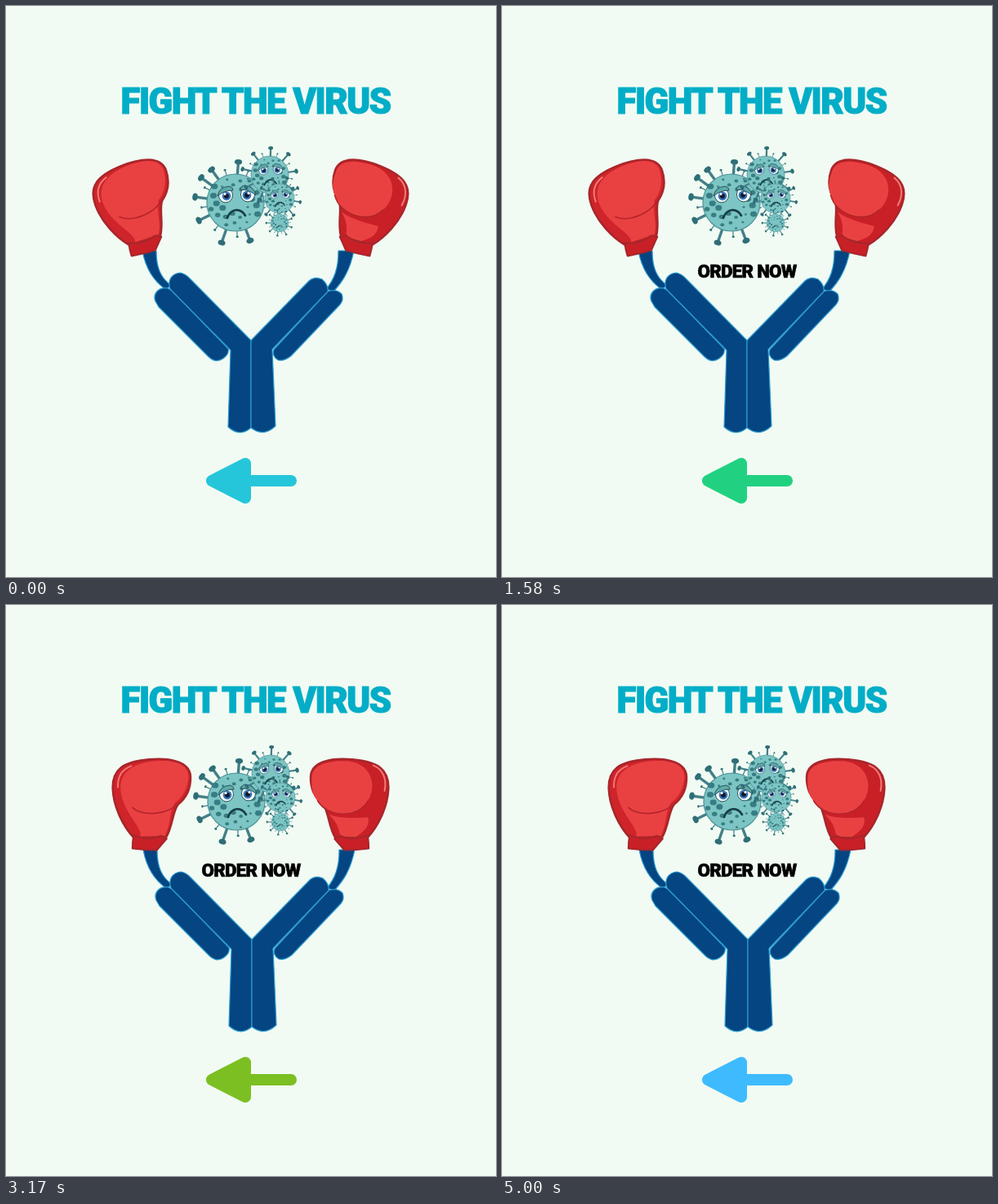
These frames come from a looping animation (600x700 px, 5.04 s). An HTML page:

```html
<!DOCTYPE html>
<html lang="en">
<head>
<meta charset="utf-8">
<title>Fight the virus</title>
<style>
  html, body { margin: 0; width: 100%; height: 100%; overflow: hidden; background: #f1fbf3; }
  svg { display: block; width: 600px; height: 700px; }
  text { font-family: Roboto, sans-serif; font-weight: 900; font-stretch: 70%; text-anchor: middle; paint-order: stroke; }
  .chain path { fill: #054581; stroke: #2a9bd0; stroke-width: 1.2; stroke-linejoin: round; }
  .lit { fill: #e94142; }
  .crease { fill: none; stroke: #b3242a; stroke-width: 1.6; stroke-linecap: round; }
  .shine { fill: none; stroke: #f07a77; stroke-width: 2; stroke-linecap: round; }
</style>
</head>
<body>
<svg viewBox="0 0 600 700">
  <defs>
    <path id="fist" stroke="#a8262b" stroke-width="2.6" stroke-linejoin="round"
      d="M160 287C148 272 138 248 138.500 226C139 202 153 193 185 192.500C212 192 235 199 234.500 217
         C234 232 227 243 217 250C209 259 209 276 199 290Z"/>
    <path id="cuff" fill="#c92027" stroke="#a8262b" stroke-width="2.2" stroke-linejoin="round"
      d="M160 284Q178 293 193 287L200 291Q194 297 187 304Q172 303 157.500 300Q158 292 160 284Z"/>
  </defs>
  <text id="title" x="305.500" y="131.500" fill="#02adc7" stroke="#02adc7" stroke-width="1.2">FIGHT THE VIRUS</text>
  <text id="order" x="300" y="333" stroke="#000" stroke-width=".6">ORDER NOW</text>

  <g id="body">
    <g class="chain">
      <path d="M167 300L184 300C184 322 190 334 203 343L195 347C182 338 171 322 167 300Z"/>
      <path d="M407 300L426 300C421 325 412 338 401 350L392 347C402 335 407 322 407 300Z"/>
      <path d="M183 362C179 352 188 344 198 346L203 349L272 420C274 428 264 435 257 435Q252 434 248 430L187 369Z"/>
      <path d="M394 350Q404 346 411 353Q414 360 409 366L349 429Q340 436 333 434Q325 429 328 421Z"/>
      <path d="M300 410L300 517Q286 529 272 516L275 422L201 347C197 335 204 328 213 327Q219 328 224 333Z"/>
      <path d="M300 410L371 337Q378 331 387 335Q395 342 394 350L326 421L330 515Q315 529 300 517Z"/>
    </g>
    <g id="germs"></g>
  </g>

  <g id="left">
    <use href="#fist" fill="#cf242a"/>
    <path class="lit" d="M148 226C149 203 170 195 193 195C221 195 233 204 232 217C230 232 223 242 213 248
      C205 260 206 276 198 287L168 286C172 274 148 256 148 226Z"/>
    <path class="crease" d="M161 250C173 262 202 262 217 249"/>
    <path class="shine" d="M145 224C145 212 150 203 163 199"/>
    <use href="#cuff"/>
  </g>
  <g id="right">
    <use href="#fist" fill="#c92027" transform="translate(599) scale(-1 1)"/>
    <path class="lit" d="M366 218C365 202 386 195 410 195C438 197 446 222 437 241C427 264 390 267 375 246C368 238 366 230 366 218Z"/>
    <path class="lit" d="M390 262C406 266 421 264 438 262C442 274 432 281 425 287L406 288C403 275 398 268 390 262Z"/>
    <path class="crease" d="M437 241C427 264 390 267 375 246"/>
    <path class="shine" d="M440 198C452 202 458 213 456 228"/>
    <use href="#cuff" transform="translate(599) scale(-1 1)"/>
  </g>

  <g id="arrow" stroke-width="14" stroke-linejoin="round" stroke-linecap="round">
    <path d="M252 582L293 561V603ZM298 582H349"/>
  </g>
</svg>
<script>
const $ = id => document.getElementById(id);
const RAD = Math.PI / 180;
const LOOP = 5040, STEP = 1000 / 24, PUNCH = 1300;

// Take the narrowest face at hand, track it within limits, then size it evenly to its line
function fit(el, size, target) {
  el.style.fontSize = size + 'px';
  const widths = ['Noto Sans', 'Open Sans', 'Roboto'].map(name => {
    el.style.fontFamily = `"${name}", sans-serif`;
    return [el.getComputedTextLength(), el.style.fontFamily];
  });
  const [w, family] = widths.sort((a, b) => a[0] - b[0])[0];
  const n = el.textContent.length;
  const track = Math.max(-0.035, Math.min(0.06, (target - w) / n / size));
  const real = w + track * n * size;
  el.style.fontFamily = family;
  el.style.letterSpacing = track + 'em';
  if (real > target) el.style.fontSize = size * target / real + 'px';
}

function eye(x, y, side) {
  return `<g transform="translate(${x} ${y}) scale(${side} 1)">
    <ellipse rx="8.500" ry="9" fill="#fff" stroke="#28535b"/>
    <circle cx="1" cy="1" r="5.400" fill="#3974b8"/><circle cx="1" cy="1" r="3" fill="#101c2c"/>
    <circle cx="-1" cy="-1.500" r="1.600" fill="#fff"/>
    <path d="M-10 1Q-8 -10 4 -11Q9 -10 9 -6Q-2 -6 -10 1Z" fill="#5fa9aa" stroke="#28535b"/></g>`;
}

function germ(x, y, r, angles, face) {
  let s = '';
  const spike = (a, len, width, knob) => {
    const c = Math.cos(a * RAD), d = Math.sin(a * RAD);
    s += `<path d="M${33 * c} ${33 * d}L${len * c} ${len * d}" stroke="#447f87" stroke-width="${width}"/>
      <ellipse rx="${knob * 0.7}" ry="${knob}" fill="#2f6e77" transform="translate(${len * c} ${len * d}) rotate(${a})"/>`;
  };
  angles.forEach((a, i) => {
    spike(a, i % 3 == 1 ? 52 : 50, 3.4, 4.6);
    spike(a + 18, 42, 1.2, 1.7);
  });
  s += '<circle r="35" fill="#7cc5c4" stroke="#4b9299" stroke-width="1.200"/>';
  for (let i = 6; i < 34; i++) {
    const q = 33 * Math.sqrt(i / 34), a = i * 137.5 * RAD;
    const size = 1.3 + i * 7 % 4 * 0.7;
    s += `<ellipse cx="${q * Math.cos(a)}" cy="${q * Math.sin(a)}" rx="${size * 1.2}" ry="${size}" fill="#377d83"/>`;
  }
  if (face) s += eye(-12, -9, 1) + eye(15, -10, -1);
  s += '<path d="M-10 19C-6 7 6 6 12 16" fill="none" stroke="#173c45" stroke-width="2.600" stroke-linecap="round"/>';
  return `<g transform="translate(${x} ${y}) scale(${r / 35})">${s}</g>`;
}

const ring = (n, from) => Array.from({ length: n }, (_, i) => from + i * 360 / n);
$('germs').innerHTML =
  germ(281, 241, 35, [69, 109, 154, 188, 216, 234, 274, 311], true) +
  germ(323, 207, 23, ring(9, 32), true) +
  germ(335, 236, 18, ring(9, 10), true) +
  germ(335, 266, 11, ring(9, 20), false);

fit($('title'), 49, 330);
fit($('order'), 23, 121);

// Glove turn, shift x, shift y, body shift: from open to closed
const poses = [[-21, -7, -1, 0], [-16, -5, 0, 1], [-10.5, -4, -1, 0], [-4, -3, -3, 1], [0, 0, 0, 1]];
// Start time within a punch, pose
const beats = [[0, 0], [320, 1], [470, 2], [560, 3], [620, 4], [1045, 3], [1125, 2], [1210, 1]];

function arrowColor(step) {
  const a = -step * 360 / 19 * RAD, c = Math.cos(a), s = Math.sin(a);
  const mix = [[-127.4, 52.6], [32.6, -28.6], [52.6, 127.4]];
  return `rgb(${mix.map(([p, q]) => Math.max(0, Math.min(255, Math.round(165.4 + p * c + q * s))))})`;
}

function draw(now) {
  const k = Math.min(120, Math.floor((now % LOOP + 5) / STEP));
  const t = k * STEP % PUNCH;
  const [turn, dx, dy, shift] = poses[beats.filter(b => b[0] <= t).pop()[1]];
  $('left').setAttribute('transform', `translate(${dx} ${dy}) rotate(${turn} 179 295)`);
  $('right').setAttribute('transform', `translate(${-dx} ${dy}) rotate(${-turn} 420 295)`);
  $('body').setAttribute('transform', `translate(${shift})`);
  $('order').style.visibility = k ? 'visible' : 'hidden';
  const color = arrowColor(Math.max(0, Math.floor(19 * k / 12) - 1));
  $('arrow').setAttribute('fill', color);
  $('arrow').setAttribute('stroke', color);
}

const start = performance.now();
function tick() {
  draw(performance.now() - start);
  requestAnimationFrame(tick);
}
tick();
</script>
</body>
</html>
```
